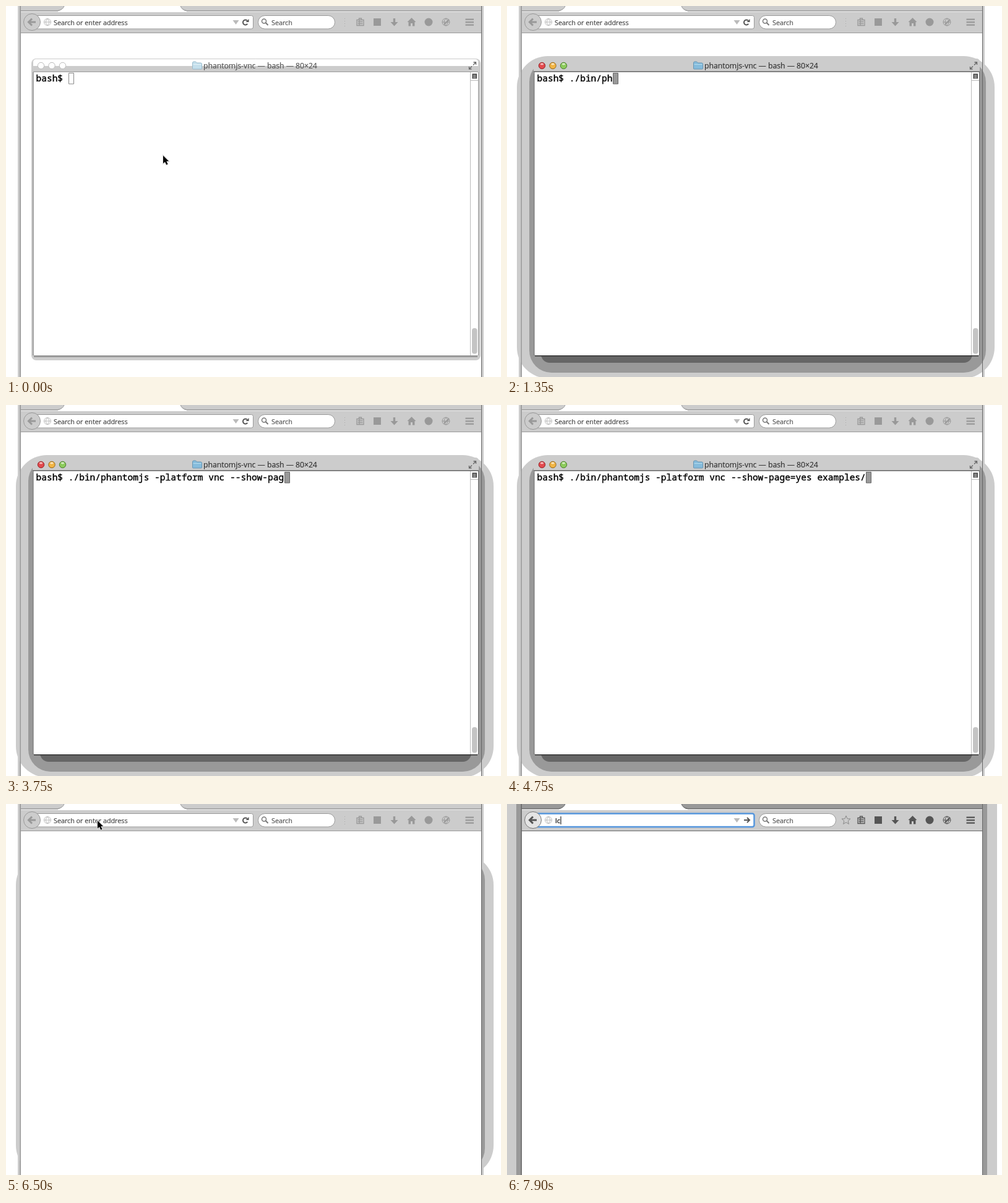
Write an HTML page with a canvas that moves like this. It is 800 by 600 pixels and loops after 8 s.

```html
<!DOCTYPE html>
<html lang="en">
<head>
<meta charset="utf-8">
<style>
html, body { margin: 0; width: 100%; height: 100%; overflow: hidden; background: #fff; }
canvas { display: block; }
</style>
</head>
<body>
<canvas id="stage" width="800" height="600"></canvas>
<script>
const c = document.getElementById('stage').getContext('2d');
const LOOP = 8000, FOCUS = 50, RUN = 5450, OUTPUT = 5500, CLICK = 6450, ACTIVE = 6850;
const UI = '"Open Sans", sans-serif', MONO = '14.53px "Noto Sans Mono", monospace';
const COL = 8.72, LEFT = 48.5;
const LIGHT = '#ccc', MID = '#999', DARK = '#666';
const COMMAND = 'bash$ ./bin/phantomjs -platform vnc --show-page=yes examples/tweets.js';
const SERVER = 'QVNCServer created on "127.0.0.1" port 5900 mode websocket';

// [time, characters on the command line]; equal times make a jump (completion)
const TYPING = [[900, 6], [1350, 14], [1550, 17], [1700, 17], [1700, 22], [1900, 22],
  [2750, 34], [3550, 45], [3650, 45], [3650, 46], [3750, 46], [3900, 49], [4050, 49],
  [4400, 55], [4650, 55], [4650, 61], [4700, 61], [5250, 70]];

function typed(t) {
  if (t < TYPING[0][0]) return TYPING[0][1];
  for (let i = TYPING.length - 1; i >= 0; i--) {
    const [t0, n0] = TYPING[i];
    if (t < t0) continue;
    if (i === TYPING.length - 1) return n0;
    const [t1, n1] = TYPING[i + 1];
    return Math.floor(n0 + (n1 - n0) * (t - t0) / (t1 - t0) + 1e-6);
  }
}

function rect(x, y, w, h, fill) {
  c.fillStyle = fill;
  c.fillRect(x, y, w, h);
}

function paint(fill, stroke, width = 1) {
  if (fill) { c.fillStyle = fill; c.fill(); }
  if (stroke) { c.strokeStyle = stroke; c.lineWidth = width; c.stroke(); }
}

function round(x, y, w, h, r, fill, stroke, width) {
  c.beginPath();
  c.roundRect(x, y, w, h, r);
  paint(fill, stroke, width);
}

function circle(x, y, r, fill, stroke, width) {
  c.beginPath();
  c.arc(x, y, r, 0, 7);
  paint(fill, stroke, width);
}

function path(d, x, y, fill, stroke, width) {
  c.save();
  c.translate(x, y);
  const p = new Path2D(d);
  if (fill) { c.fillStyle = fill; c.fill(p); }
  if (stroke) { c.strokeStyle = stroke; c.lineWidth = width || 1; c.stroke(p); }
  c.restore();
}

// A hairline outline gives the slightly heavier screen weight
function text(s, x, y, font, fill, weight = .2) {
  c.font = font;
  c.fillStyle = c.strokeStyle = fill;
  c.lineWidth = weight;
  c.fillText(s, x, y);
  c.strokeText(s, x, y);
}

function globe(x, y, r, ink) {
  circle(x, y, r, null, ink);
  path(`M${-r} 0H${r}M0 ${-r}Q${-r} 0 0 ${r}M0 ${-r}Q${r} 0 0 ${r}`, x, y, null, ink);
}

function browserEdges(active) {
  if (active) {
    rect(0, 0, 792, 600, LIGHT);
    rect(15, 0, 761, 600, MID);
  } else {
    rect(19, 0, 753, 600, LIGHT);
  }
  rect(24, 43, 744, 557, '#fff');
  rect(22.5, 0, 1.5, 600, active ? DARK : MID);
  rect(768, 0, 1, 600, DARK);
}

function tabs(active) {
  rect(24, 0, 744, 8, active ? MID : LIGHT);
  rect(24, 7, 744, 1, active ? DARK : MID);
  rect(24, 8, 744, 35, LIGHT);
  rect(24, 9, 744, 1, '#e4e4e4');
  path('M94 0Q92 6 84 8.5V10H292V8.5Q284 7 282 0Z', 0, 0, '#fff');
  path('M94 0Q92 6 84 7.5M282 0Q284 6 292 7.5', 0, 0, null, active ? DARK : MID);
  rect(24, 43, 744, 1, active ? DARK : MID);
}

function toolbar(t, active) {
  const ink = active ? '#555' : MID;
  tabs(active);
  round(46, 15.5, 353.5, 21.5, 3, '#fff', active ? '#5596dd' : MID, active ? 2.5 : 1);
  circle(42, 26, 13.5, active ? '#e4e4e4' : LIGHT, active ? '#777' : MID);
  path('M6 0H-5M0 -5.5L-5.5 0L0 5.5', 42, 26, null, ink, 3);
  globe(67, 26, 5.5, '#bbb');

  const word = t >= 7900 ? 'lc' : t >= 7800 ? 'l' : '';
  const font = '10.75px ' + UI;
  if (word) text(word, 78, 30.5, font, '#000');
  else text('Search or enter address', 77, 30.5, font, '#444');
  if (active && (t < 7200 || t >= 7650)) {
    c.font = font;
    rect(Math.round(78 + c.measureText(word).width) + .5, 20, 1, 13, '#000');
  }

  path('M-5 -3H5L0 4Z', 371.5, 26, '#bbb');
  if (active) {
    path('M-5 0H4M0 -4L4 0L0 4', 388, 26, null, '#555', 2);
  } else {
    path('M3.2 2.4A4 4 0 1 1 2.6 -3', 387, 26.5, null, '#555', 2);
    path('M5.5 -5V0H.5Z', 387, 26, '#555');
  }

  round(407.5, 15.5, 124, 21.5, 10.7, '#fff', MID);
  circle(417, 24.5, 3.5, null, '#777', 1.5);
  path('M0 0L4 4', 419.5, 27, null, '#777', 2);
  text('Search', 429, 30.5, font, '#555');

  if (active) path('M0 -7L2 -2.2L7 -2L3.2 1.3L4.4 6.4L0 3.6L-4.4 6.4L-3.2 1.3L-7 -2L-2 -2.2Z', 548, 26, null, '#888');
  else for (let y = 20; y < 34; y += 4) rect(547, y, 1, 1, '#aaa');

  path('M-5.5 -3.5H5.5V5.5H-5.5ZM-2 -4V-6H2V-4M-4 -.5H4M-4 2.5H4M-1.5 -3V5', 572.5, 26, null, ink, 1.3);
  round(594, 20, 12, 12, 0, ink);
  path('M-1.7 -6H1.7V0H6L0 6.5L-6 0H-1.7Z', 627.5, 26, ink);
  path('M0 -7L7 0H5V6.5H1.5V2H-1.5V6.5H-5V0H-7Z', 655.5, 26, ink);
  circle(683, 26, 6.5, ink);
  globe(711, 26, 6, ink);
  path('M-3 4L5 -4', 711, 26, null, ink, 2);
  for (const y of [20.5, 25, 29.5]) rect(742.5, y, 13.5, 2.3, ink);
}

function shadow() {
  round(16, 81, 772, 521, 50, LIGHT);
  round(36, 87, 738, 506, 36, MID);
  round(55, 530, 697, 47, 14, DARK);
}

function folder(x, pale) {
  path('M0 2Q0 0 2 0H5L7 2H13Q15 2 15 4V11Q15 12 14 12H1Q0 12 0 11Z', x, 90,
    pale ? '#c4dfec' : '#86bcdc', pale ? '#9bc' : '#6795b3');
  rect(x + 1, 94, 13, 1, pale ? '#e4f2f8' : '#b5dcee');
}

function titleBar(t, focused) {
  const running = t >= RUN;
  if (focused) {
    round(43, 85, 721, 24, [5, 5, 0, 0], LIGHT);
    rect(43, 105.5, 721, 1.5, DARK);
  } else {
    round(43.5, 85.5, 720, 24, [5, 5, 0, 0], '#fff', LIGHT);
    rect(44, 97, 719, 9, LIGHT);
    rect(44, 106, 719, 1, MID);
  }
  const fills = ['#e34a4e', '#f2b544', '#8ccb5c'], rims = ['#8d2327', '#94671b', '#477a2b'];
  for (let i = 0; i < 3; i++) {
    const x = 56.5 + i * 17.5;
    circle(x, 96.5, 5.2, focused ? fills[i] : '#fff', focused ? rims[i] : '#bbb');
    if (focused) {
      c.beginPath();
      c.ellipse(x, 94, 2.6, 1.4, 0, 0, 7);
      paint('rgba(255,255,255,.65)');
    }
  }
  if (running) circle(56.5, 97, 1.6, '#511');
  folder(running ? 286 : 301.5, running || !focused);
  text(`phantomjs-vnc — ${running ? 'phantomjs' : 'bash'} — 80×24`, running ? 303.5 : 319, 100.5,
    '12.2px ' + UI, focused ? '#333' : '#555');
  path('M1 -1L5 -5M1.5 -5.5H5.5V-1.5M-1 1L-5 5M-5.5 1.5V5.5H-1.5', 754, 96.5, null, '#666', 1.3);
}

function terminal(t) {
  const focused = t >= FOCUS;
  if (focused) shadow();
  else round(41, 85, 726, 488, 8, LIGHT);
  rect(768, 0, 1, 600, DARK);
  rect(22.5, 0, 1.5, 600, MID);
  titleBar(t, focused);
  round(44, 107, 719, 458.5, [0, 0, 3, 3], '#fff');
  rect(43.5, 107, 1, 458, DARK);
  rect(763, 107, 1, 458, focused ? DARK : MID);
  rect(45, 565, 717, focused ? 1.5 : 3, focused ? '#333' : MID);
  rect(750, 107, 1, 458, '#bbb');
  rect(751, 120, 12, 1, '#bbb');
  rect(753.5, 109.5, 7.5, 8, '#444');
  for (const y of [111.5, 113.5, 115.5]) rect(755, y, 4.5, 1, '#ccc');
  round(753, 521, 8.5, 41.5, 4, '#c4c4c4');

  const n = typed(t);
  text(COMMAND.slice(0, n), LEFT, 122, MONO, '#000', .4);
  if (t >= OUTPUT) text(SERVER, LEFT, 141, MONO, '#000', .4);
  const row = t >= OUTPUT ? 2 : t >= RUN ? 1 : 0;
  const x = Math.round(LEFT + (row ? 0 : n * COL)) + .5, y = 108.5 + row * 18.7;
  round(x, y, 8, 17.5, 0, focused ? MID : '#fff', focused ? DARK : '#888');
}

function pointer(x, y) {
  const arrow = 'M0 0V12.5L3 10L5.2 14.7L7.4 13.7L5.3 9.1H9Z';
  path(arrow, x, y, null, '#ddd', 2);
  path(arrow, x, y, '#000');
}

function mouse(t) {
  if (t < 950) return pointer(254, 242);
  if (t < 5900 || t >= 7550) return;
  const p = Math.min(1, (t - 5900) / 500), e = p * p * (3 - 2 * p);
  pointer(254 - 106 * e, 242 - 215 * e);
}

function draw(t) {
  const active = t >= ACTIVE;
  rect(0, 0, 800, 600, '#fff');
  browserEdges(active);
  if (t < CLICK) terminal(t);
  else if (!active) {
    shadow();
    rect(24, 43, 744, 557, '#fff');
    rect(22.5, 0, 1.5, 600, MID);
    rect(768, 0, 1, 600, DARK);
  }
  toolbar(t, active);
  mouse(t);
}

const start = performance.now();
function frame() {
  const t = (performance.now() - start) % LOOP;
  draw(Math.floor(t / 50) * 50);
  requestAnimationFrame(frame);
}
frame();
</script>
</body>
</html>
```
